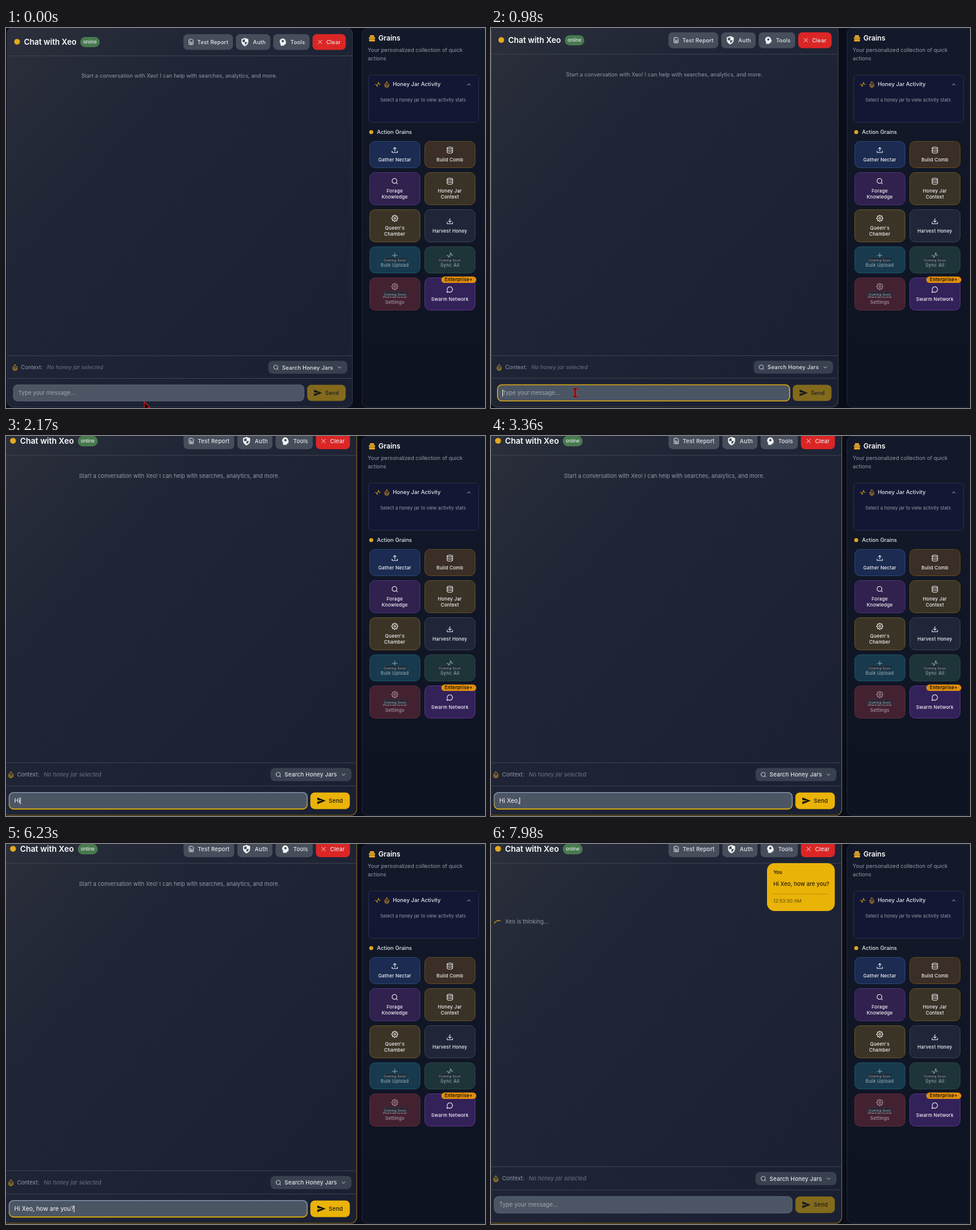
Recreate the animation shown at these times as an HTML page. Size 800 px wide and 635 px high, loop 8000 ms.

```html
<!DOCTYPE html>
<html lang="en">
<head>
<meta charset="utf-8">
<title>Chat panel</title>
<style>
html, body { margin: 0; height: 100%; overflow: hidden; background: #090c19; }
svg { display: block; width: 800px; height: 635px; }
text { font: 400 9.1px Inter, sans-serif; white-space: pre; fill: #e5e7eb; }
.mid { text-anchor: middle; }
.title { font-weight: 600; font-size: 13px; fill: #fff; }
.sub { font-size: 11.7px; }
.medium { font-weight: 500; }
.btn { font-weight: 500; letter-spacing: .02em; }
.small { font-size: 7.8px; }
.muted { fill: #9299a6; }
.label { font-size: 7.8px; font-weight: 500; letter-spacing: .025em; text-anchor: middle; fill: #f3f4f6; }
.soon { font-size: 5.3px; letter-spacing: .05em; text-anchor: middle; fill: #b6bcc5; }
.typed { font-size: 9.75px; fill: #f9fafb; }
.hint { fill: #9ca3af; }
.icon { fill: none; stroke-width: 2.1; stroke-linecap: round; stroke-linejoin: round; }
.line { stroke: #3b4352; }
</style>
</head>
<body>
<svg id="stage" viewBox="0 0 800 635">
  <defs>
    <linearGradient id="panelFill" x1="0" y1="0" x2="1" y2="1">
      <stop offset="0" stop-color="#2c2f3b"/>
      <stop offset=".3" stop-color="#202636"/>
      <stop offset="1" stop-color="#1a2032"/>
    </linearGradient>
    <linearGradient id="sideFill" x1="0" y1="0" x2="0" y2="1">
      <stop offset="0" stop-color="#131929"/>
      <stop offset="1" stop-color="#0d1321"/>
    </linearGradient>
    <linearGradient id="ring" x1="0" y1="0" x2="0" y2="1">
      <stop offset="0" stop-color="#8290ac"/>
      <stop offset=".6" stop-color="#8d8a78"/>
      <stop offset="1" stop-color="#eab308"/>
    </linearGradient>
  </defs>

  <g id="panel">
    <rect x="2" y="-1" width="576.5" height="634.5" rx="10" fill="url(#panelFill)" stroke="#343b4a"/>
    <rect id="glow" x="2" y="-1" width="576.5" height="634.5" rx="10" fill="none" stroke="#8a6913"/>
    <path class="line" d="M2 46.5H578"/>
    <circle cx="18.5" cy="23" r="4.8" fill="#e3a820"/>
    <text class="title" x="30" y="27.8">Chat with Xeo</text>
    <rect x="124" y="15" width="32.5" height="17" rx="8.5" fill="#477a4f"/>
    <text class="small medium mid" x="140.2" y="26.2">online</text>
    <g id="toolbar"></g>

    <text id="welcome" class="muted mid" x="289.3" y="83.2">Start a conversation with Xeo! I can help with searches, analytics, and more.</text>

    <g id="bubble">
      <rect x="456.8" y="46.3" width="110.4" height="78" rx="12" fill="#eab308"/>
      <g fill="#2b2208">
        <text class="small" style="font-weight:600;fill:inherit" x="467" y="64">You</text>
        <text style="fill:inherit" class="medium" x="467" y="83">Hi Xeo, how are you?</text>
        <text class="small" style="fill:#5d4a0c" x="467" y="111">12:53:30 AM</text>
      </g>
      <path d="M467 96.8H557" stroke="#c29509"/>
    </g>
    <g id="thinking">
      <path id="spinner" d="M-5.5 -5.5A7.8 7.8 0 0 1 5.5 -5.5" fill="none" stroke="#c9981a" stroke-width="1.4"/>
      <text class="muted" x="30" y="144.8">Xeo is thinking...</text>
    </g>

    <g id="footer">
      <path class="line" d="M2 547.8H578M2 585.5H578"/>
      <g id="context"></g>
      <text class="muted" x="25" y="570.4">Context:</text>
      <text x="68.5" y="570.4" style="font-style:italic;fill:#6d7584">No honey jar selected</text>
      <rect x="438" y="556.3" width="132" height="21.5" rx="7" fill="#394150"/>
      <text class="btn" x="461" y="570.5" fill="#d1d5db">Search Honey Jars</text>
      <rect id="field" x="12.3" y="596.3" width="485.5" height="27" rx="7" fill="#4b5563"/>
      <text id="placeholder" x="20.5" y="613.3" style="font-size:9.4px;fill:#a0a7b3">Type your message...</text>
      <text x="20.5" y="613.3" class="typed"><tspan id="typed"></tspan><tspan id="hint" class="hint"></tspan></text>
      <path id="caret" d="M0 604.3V615.6" stroke="#fff"/>
      <g id="send">
        <rect x="503" y="596.3" width="64.3" height="27" rx="7" fill="#eab308"/>
        <path d="M514.3 604.3L528 609.8L514.3 615.3V611.1L522.5 609.8L514.3 608.5Z" fill="#16130a"/>
        <text class="btn" x="533" y="613.2" style="fill:#221b08">Send</text>
      </g>
    </g>
  </g>

  <g id="side">
    <rect x="580" y="0" width="0" height="0"/>
    <rect x="594.5" y=".5" width="212" height="633.5" rx="9" fill="url(#sideFill)" stroke="#20283a"/>
    <g fill="#e3a526">
      <rect x="607.5" y="12" width="7.5" height="3" rx="1.5"/>
      <rect x="606" y="15.2" width="10.5" height="3" rx="1"/>
      <rect x="606.3" y="18.6" width="10" height="3.8" rx="1.5"/>
    </g>
    <text class="title sub" x="622" y="21.3">Grains</text>
    <text class="muted" x="604" y="40.2">Your personalized collection of quick</text>
    <text class="muted" x="604" y="53.5">actions</text>
    <rect x="605.5" y="78.5" width="184" height="79" rx="5" fill="#141734" stroke="#27304b"/>
    <text class="medium" x="646" y="97.3">Honey Jar Activity</text>
    <text class="small muted mid" x="696.5" y="123.2">Select a honey jar to view activity stats</text>
    <circle cx="610" cy="174" r="3.3" fill="#e3a820"/>
    <text class="medium" x="619.5" y="177.3">Action Grains</text>
    <g id="cards"></g>
    <rect x="727" y="415.3" width="58.5" height="10.8" rx="5.4" fill="#e08e0c"/>
    <text class="label" x="756" y="423.4" style="font-weight:600;fill:#1a1206">Enterprise+</text>
  </g>

  <g id="pointer" stroke="#e01b1b" stroke-width="1.2" stroke-linejoin="round">
    <path d="M0 0V13L3.2 10.4L5.6 15.4L7.8 14.3L5.5 9.5L9.4 9Z" fill="#080808"/>
  </g>
  <g id="beam" fill="none">
    <path d="M-3.5 -6.5H3.5M0 -6.5V6.5M-3.5 6.5H3.5" stroke="#e01b1b" stroke-width="3"/>
    <path d="M-3 -6.5H3M0 -6.5V6.5M-3 6.5H3" stroke="#1a0505"/>
  </g>
</svg>

<script>
const $ = id => document.getElementById(id);

// Icon outlines on a 24-unit grid
const icons = {
  upload: 'M21 15v5H3v-5M17 8l-5-5-5 5M12 3v12',
  download: 'M21 15v5H3v-5M7 10l5 5 5-5M12 15V3',
  data: 'M3 5a9 3 0 0 1 18 0a9 3 0 0 1-18 0v14a9 3 0 0 0 18 0V5M3 12a9 3 0 0 0 18 0',
  search: 'M3 11a8 8 0 0 1 16 0a8 8 0 0 1-16 0M21 21l-4.3-4.3',
  plus: 'M12 4v16M4 12h16',
  pulse: 'M2 12h4l3 9 6-18 3 9h4',
  chat: 'M7.9 20A9 9 0 1 0 4 16.1L2 22Z',
  drop: 'M12 2C8 7 4 10.500 4 15a8 8 0 0 0 16 0C20 10.500 16 7 12 2ZM8 15a4 4 0 0 0 8 0l-4-4Z',
  file: 'M15 2H6a2 2 0 0 0-2 2v16a2 2 0 0 0 2 2h12a2 2 0 0 0 2-2V7ZM8 10h2M8 14h8M8 18h8',
  cross: 'M5 5l14 14M19 5L5 19',
  up: 'M6 15l6-6 6 6',
  down: 'M6 9l6 6 6-6',
  gear: gearPath()
};

function gearPath() {
  const points = Array.from({ length: 32 }, (_, i) => {
    const r = i % 4 < 2 ? 10.5 : 7.8, a = (i - .5) * Math.PI / 16;
    return `${(12 + r * Math.cos(a)).toFixed(1)} ${(12 + r * Math.sin(a)).toFixed(1)}`;
  });
  return `M${points.join('L')}ZM9 12a3 3 0 0 1 6 0a3 3 0 0 1-6 0`;
}

const icon = (name, x, y, size = 12, color = '#f3f4f6') =>
  `<path class="icon" stroke="${color}" d="${icons[name]}"
    transform="translate(${x - size / 2} ${y - size / 2}) scale(${size / 24})"/>`;

const box = (x, y, w, h, r, fill, stroke = 'none') =>
  `<rect x="${x}" y="${y}" width="${w}" height="${h}" rx="${r}" fill="${fill}" stroke="${stroke}"/>`;

const button = (x, w, textX, label, fill = '#464d5b') =>
  box(x, 10.3, w, 26.3, 7, fill) + `<text class="btn" x="${textX}" y="27">${label}</text>`;

$('toolbar').innerHTML =
  button(296.3, 82.7, 319.5, 'Test Report') + icon('file', 309, 23.3, 10.5) +
  button(384, 57.3, 412.5, 'Auth') +
  '<path d="M399 16.500l5.800 2.300v4.200q0 5-5.800 7.500q-5.800-2.500-5.800-7.500v-4.200Z" fill="#f3f4f6"/>' +
  '<path d="M399 18.500v5h-4v-3.300ZM399 23.500h4q-.6 3-4 5Z" fill="#464d5b"/>' +
  button(446.3, 60.7, 475, 'Tools') +
  '<path d="M458.500 29.500v-3.500a5 5 0 1 1 8.500-4l1.300 2.700h-1.300v2.800h-2.500v2Z" fill="#f3f4f6"/>' +
  '<circle cx="462.300" cy="22" r="1.900" fill="#464d5b"/>' +
  button(512, 55.5, 535, 'Clear', '#dc2626') + icon('cross', 524.6, 23.3, 10);

$('context').innerHTML = icon('drop', 15, 567.3, 11, '#e3a820');
$('footer').insertAdjacentHTML('beforeend',
  icon('search', 451, 567.3, 10.5, '#d1d5db') + icon('down', 557, 567.3, 10, '#d1d5db'));
$('side').insertAdjacentHTML('beforeend',
  icon('pulse', 621, 94.3, 10, '#eab308') + icon('drop', 636, 94.3, 10.5, '#e3a820') +
  icon('up', 773, 94.3, 10, '#c3c8d0'));

// [icon, label lines, fill, border, coming soon]
const cards = [
  ['upload', 'Gather Nectar', '#1b2b51', '#2b4677'],
  ['data', 'Build Comb', '#3a2e27', '#684a20'],
  ['search', 'Forage|Knowledge', '#30214e', '#4d307a'],
  ['data', 'Honey Jar|Context', '#393227', '#635122'],
  ['gear', 'Queen\'s|Chamber', '#3b3426', '#695521'],
  ['download', 'Harvest Honey', '#202638', '#394252'],
  ['plus', 'Bulk Upload', '#173a4e', '#1f5063', true],
  ['pulse', 'Sync All', '#1d3439', '#284747', true],
  ['gear', 'Advanced|Settings', '#432131', '#652b3a', true],
  ['chat', 'Swarm Network', '#33215a', '#593689']
];
const rowTops = [189.5, 241.5, 303.5, 365.5, 417.5];
const rowHeights = [44, 54, 54, 44, 54];

$('cards').innerHTML = cards.map(([name, label, fill, border, soon], i) => {
  const row = i >> 1, x = i % 2 ? 699.5 : 607.5, cx = x + 41.8;
  const mid = rowTops[row] + rowHeights[row] / 2;
  const lines = label.split('|');
  const two = lines.length > 1;
  const text = lines.map((s, n) =>
    `<text class="label" x="${cx}" y="${mid + (two ? 4 : 9) + n * 10 + 2.9}">${s}</text>`).join('');
  const badge = soon
    ? box(cx - 19.5, mid - 4, 39, 8, 2, '#1c2732', '#33404b').replace('/>', ' fill-opacity=".75" stroke-width=".6"/>') +
      `<text class="soon" x="${cx}" y="${mid + 2}">Coming Soon</text>`
    : '';
  return box(x, rowTops[row], 84, rowHeights[row], 9, fill, border) +
    `<g opacity="${soon ? .55 : 1}">${icon(name, cx, mid - (two ? 12.5 : 7.5))}${text}</g>` + badge;
}).join('');

const LOOP = 8000, FOCUS = 910, FIRST_KEY = 1680, SUBMIT = 6510;
const message = 'Hi Xeo, how are you?';
const keyTimes = [1680, 1960, 2380, 2590, 2800, 3080, 3360, 3570, 3710, 3920,
  4130, 4340, 4550, 4760, 4970, 5110, 5320, 5530, 5670, 6230];
const HINT_START = 4760;
const pointerPath = [[0, 231, 625], [70, 231, 625], [630, 154, 618], [840, 140.5, 609.5]];

const clamp = v => Math.max(0, Math.min(1, v));
const ease = (t, start, length) => {
  const p = clamp((t - start) / length);
  return p * p * (3 - 2 * p);
};
const show = (id, on) => { $(id).style.display = on ? '' : 'none'; };

function pointerAt(t) {
  const next = pointerPath.findIndex(p => p[0] > t);
  if (next < 0) return pointerPath.at(-1).slice(1);
  const [t0, x0, y0] = pointerPath[next - 1], [t1, x1, y1] = pointerPath[next];
  const p = ease(t, t0, t1 - t0);
  return [x0 + (x1 - x0) * p, y0 + (y1 - y0) * p];
}

function render(t) {
  const lift = ease(t, FOCUS, 250);
  const scale = 1 + .025 * lift;
  $('panel').setAttribute('transform',
    `translate(${289.5 * (1 - scale)} ${-15.5 * lift}) scale(${scale})`);
  $('glow').setAttribute('opacity', lift);

  const sent = t >= SUBMIT;
  const focused = t >= FOCUS && !sent;
  const count = sent ? 0 : keyTimes.filter(k => k <= t).length;
  $('typed').textContent = message.slice(0, count);
  $('hint').textContent = t >= HINT_START && !sent ? message.slice(count, -1) : '';
  show('placeholder', count === 0);
  show('caret', focused);
  const width = count ? $('typed').getComputedTextLength() : 0;
  $('caret').setAttribute('transform', `translate(${20.8 + width} 0)`);

  const field = $('field');
  field.setAttribute('stroke', !focused ? '#66707f' : t < FIRST_KEY ? '#dba914' : 'url(#ring)');
  field.setAttribute('stroke-width', focused ? 1.6 : .8);
  $('send').setAttribute('opacity', .5 + .5 * (ease(t, FIRST_KEY, 300) - ease(t, SUBMIT, 300)));

  const reply = ease(t, SUBMIT, 300);
  $('footer').setAttribute('transform', `translate(0 ${-6.5 * reply})`);
  show('welcome', !sent);
  $('bubble').setAttribute('opacity', reply);
  $('thinking').setAttribute('opacity', reply);
  $('spinner').setAttribute('transform',
    `translate(19.5 147.8) rotate(${-24 + (t - 7980) * .36})`);

  const [x, y] = pointerAt(t);
  const overField = t >= 700;
  show('pointer', !overField);
  show('beam', overField && t < FIRST_KEY);
  $(overField ? 'beam' : 'pointer').setAttribute('transform', `translate(${x} ${y})`);
}

const start = performance.now();
function tick() {
  render((performance.now() - start) % LOOP);
  requestAnimationFrame(tick);
}
tick();
</script>
</body>
</html>
```
